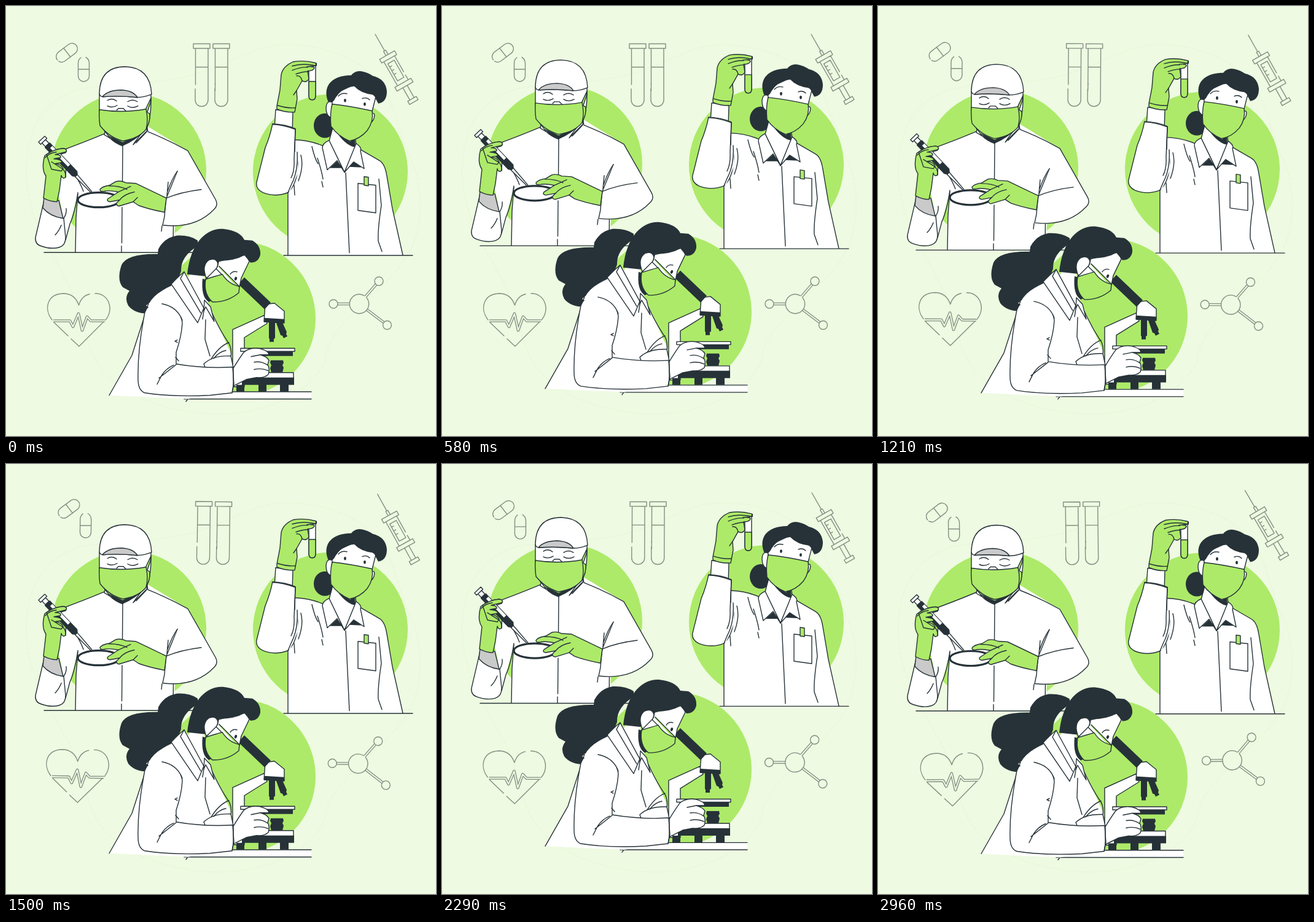
Animation, 700 px wide and 700 px high, one loop 3 s. Source, as an HTML page:

```html
<!DOCTYPE html>
<html lang="en">
<head>
<meta charset="utf-8">
<title>Scientists at work</title>
<style>
html, body { margin: 0; width: 100%; height: 100%; overflow: hidden; background: #eefae1; }
svg { display: block; width: 100vw; height: 100vh; }
path, rect, circle, ellipse { stroke-linecap: round; stroke-linejoin: round; }
.w, .g, .a, .l { stroke: #263238; stroke-width: 1.4; }
.w { fill: #fff; }
.g { fill: #adea69; }
.a { fill: #cacaca; }
.l { fill: none; }
.d { fill: #263238; }
.fw { fill: #fff; }
.fg { fill: #adea69; }
#icons { fill: none; stroke: #858d83; stroke-width: 1.4; }
#icons .wide { stroke-width: 4.6; stroke-linecap: butt; }
#icons .core { stroke: #eefae1; stroke-width: 2; }
#icons .node { fill: #eefae1; }
</style>
</head>
<body>
<svg viewBox="0 0 700 700">
<path fill="none" stroke="#e7f6d5" stroke-dasharray="5 3" d="M33 270C33 190 72 138 145 131C215 124 270 126 335 102C382 84 410 63 460 63C530 64 594 94 621 145C638 182 642 218 658 247C674 278 678 325 671 358C661 421 612 452 578 488C544 520 522 546 520 576C502 626 428 664 348 664C260 664 184 632 151 584C126 546 127 500 100 450C70 392 34 345 33 270Z"/>

<g id="icons">
  <rect x="79.500" y="67" width="39" height="18" rx="9" transform="rotate(-37 99 76)" stroke-dasharray="81 3 30"/>
  <path d="M94 69L105 83"/>
  <path d="M122 84Q117.500 87 117.500 93V114A9 9 0 0 0 135.500 114V93Q135 86 130 83.500M117.500 103H135.500"/>
  <g id="tube">
    <path d="M305 61.500H332V69H305ZM308.500 69V128M308 135V153A10.500 10.500 0 0 0 329 153V69M308.500 99.500H329"/>
  </g>
  <use href="#tube" x="32"/>
  <path d="M340.500 126V138"/>
  <g transform="translate(601 46) rotate(60.300)">
    <path d="M0 0H31M31 -2H39V2H31ZM39 -14H46V14H39ZM46 -10H76M82 -10H91V10H46M52 -6H84V6H52ZM58 6V2M65 6V2M72 6V2M91 -15H98V15H91ZM98 -4H121V4H98M121 -8H127V8H121Z"/>
  </g>
  <path d="M106 542L119 554L163 510C177 491 165 467 145 468M136 469Q123 472 118.500 487Q112 468 93 468C67 469 61 493 75 511M78 515L101 537"/>
  <path class="wide" d="M77 512.500H104L109 522L118 501L124 528L132 506L138 512.500H161"/>
  <path class="core" d="M77 512.500H104L109 522L118 501L124 528L132 506L138 512.500H161"/>
  <path class="wide" d="M575 485L533 485M575 485L607 448M575 485L620 519"/>
  <path class="core" d="M575 485L533 485M575 485L607 448M575 485L620 519"/>
  <circle class="node" cx="575" cy="485" r="15.700" stroke-dasharray="82 5"/>
  <circle class="node" cx="533" cy="485" r="7"/>
  <circle class="node" cx="607" cy="448" r="7"/>
  <circle class="node" cx="620.500" cy="519.500" r="7"/>
</g>

<g id="people">
  <!-- Man with pipette -->
  <g>
    <circle class="fg" cx="199.500" cy="268" r="126.500"/>
    <path class="fw" d="M113 401L114 345L116 310L92 300V235L161 208L190 228L230 196L296 236L275 360L272 401Z"/>
    <path class="l" d="M62 401.500H312M113 401L114 345L117 306M92 235Q125 223 161 208M272 401L272.500 355M190 227L189.500 290M189 328L188.500 386M188 391V401"/>
    <path class="w" stroke="none" d="M229 194L231 205Q266 219 296 236L341 315Q346 324 339 331C322 349 297 362 255 357L258 343Q259 330 261 313L279 269"/>
    <path fill="#fff" d="M222 206L250 220L286 242L279 269L263 302L240 290L200 260Z"/>
    <path class="l" d="M261 313Q285 303 318 299M279 269Q270 282 263 302M264 287L262 309M254 358L253 367"/>
    <path class="fw" d="M92 235L98 262L118 303Q105 350 97 385L94 346L86 310Z"/>
    <path class="w" d="M62 317L48 377Q47 388 57 391Q74 397 87 393Q97 390 97 377L94 346Q72 342 62 317Z"/>
    <path class="l" d="M117 304Q112 338 104 355L97 381M80 373Q86 367 90 357M114 278Q122 291 126 302M94 346Q99 338 98 330"/>
    <path class="a" d="M62 312L60 329Q72 343 93 346L86 317Z"/>
    <path class="d" d="M167 211L190 222L222 206L231 190L229 201Q210 220 190 228Q178 225 167 211Z"/>
    <path class="w" d="M154 191L161 205L160 210L190 228Q178 224 170 216L160 203Z"/>
    <path class="w" d="M231 190L229 204L207 226Q217 211 226 202Z"/>
    <path class="l" d="M229 205L212 223"/>
    <path class="w" d="M152 143V180L165 205L215 207L232 192Q237 170 236 143Z"/>
    <path class="w" d="M152 142Q153 99 194 99Q235 100 237 144Q226 149 213 149Q186 146 157 148Q152 147 152 142Z"/>
    <path class="a" d="M157 148Q166 137 188 137Q207 138 214 149Q186 146 157 148Z"/>
    <path class="l" d="M165 154Q173 149 180 155M198 156Q206 151 214 156M165 163Q173 167 181 162M198 163Q206 168 215 163M180 170L183 167H191L195 171"/>
    <path class="g" d="M227 169L236 150L235 158L230 173L234 176Q235 189 228 200Z"/>
    <path class="g" d="M152 169Q190 175 228 168Q232 187 228 201Q216 216 190 220Q168 214 153 195Q151 181 152 169Z"/>
    <ellipse cx="151" cy="316" rx="34" ry="12" fill="#fff" stroke="#263238" stroke-width="3.200"/>
    <path class="g" d="M153 299Q156 294 169 292L179 286Q188 284 195 288L211 289L261 313L258 336Q232 331 216 325L207 319L184 326Q179 325 180 321L185 316L169 319Q163 318 166 314L183 303Q168 300 159 302Q153 303 153 299Z"/>
    <path class="l" d="M167 293Q186 293 197 299M183 303L203 294M185 316Q193 306 209 303M207 319L214 312"/>
    <path class="g" d="M61 313L65 277Q57 266 63 244Q76 233 94 232Q101 234 97 239L87 242L98 258L97 279Q92 283 90 276L87 300L83 319Q72 319 61 313Z"/>
    <g transform="translate(58 217) rotate(46.300)">
      <path class="w" d="M0 -7H5V7H0ZM5 -4H13V4H5Z"/>
      <path class="d" d="M13 -6H78L82 -3V3L78 6H13Z"/>
      <path class="fw" d="M20 -5H62V0H20Z"/>
      <path class="w" d="M82 -2L118 0Q121 1 118 2L82 3Z"/>
    </g>
    <path class="g" d="M66 242Q78 233 94 232Q101 234 97 238L80 242Q90 242 89 247L78 249Q91 250 91 255L80 257Q90 258 93 265L90 269L74 266Z"/>
    <path class="l" d="M74 254L93 266Q98 272 97 279M64 247Q71 239 82 238"/>
  </g>

  <!-- Woman with test tube -->
  <g>
    <circle class="fg" cx="528" cy="270" r="126"/>
    <ellipse class="d" cx="519" cy="195" rx="18" ry="20"/>
    <path class="fw" d="M459 406V304L470 218Q495 218 516 229L580 236L608 252Q618 259 620 277L630 333L646 406Z"/>
    <path class="l" d="M452 406.300H662M459 406V304M470 218Q495 219 516 228M577 234L608 252Q617 257 620 277L629 330Q632 343 646 406M607 282L611 325Q605 364 606 383L612 400M553 272L559 402M498 229Q503 250 508 257M507 248Q514 269 516 282M514 286L516 295M480 243Q485 261 476 285M469 292L470 308"/>
    <path class="w" d="M439 169L437 199L466 206L467 173Z"/>
    <path class="w" stroke="none" d="M470 238L471 200Q455 193 434 192Q430 212 422 231L408 287Q406 298 418 304Q438 312 459 304Q474 290 475 260Q475 247 470 238Z"/>
    <path fill="#fff" d="M464 235L474 240L476 270L462 303L454 300Z"/>
    <path class="l" d="M434 193Q449 193 471 201M474 238Q476 270 464 292L459 304M471 201L469 250Q470 269 464 280"/>
    <path class="w" d="M573 289L602 292V337L573 333Z"/>
    <path class="g" d="M583 278L590 279V293L583 292Z"/>
    <path class="d" d="M527 264L539 253L547 264ZM557 262L566 254L579 263Z"/>
    <path class="w" d="M532 198L526 220L551 271L570 227L568 208Z"/>
    <path class="d" d="M541 210L560 221L568 215L569 230Q556 229 541 210Z"/>
    <path class="w" d="M526 219Q515 224 515 231L523 267L539 252L551 271Z"/>
    <path class="w" d="M570 224Q580 231 577 236L583 265L566 254L551 271Z"/>
    <path class="w" d="M531 145L528 188L555 214L590 195L602 148L574 125Z"/>
    <path class="d" d="M524 155Q518 139 526 127Q537 113 562 113Q569 104 581 107Q590 109 597 114Q618 119 620 139Q620 157 606 159Q602 152 599 145Q578 143 567 131Q545 133 534 154L528 160Z"/>
    <path class="w" d="M531 157Q522 153 521 166Q521 179 529 182Z"/>
    <path class="w" d="M594 175Q602 173 599 183Q597 190 591 190Z"/>
    <path class="l" d="M541 147Q546 141 555 143M580 151Q587 148 592 153"/>
    <ellipse class="d" cx="552" cy="154" rx="1.900" ry="2.800"/>
    <ellipse class="d" cx="584" cy="160" rx="1.900" ry="2.800"/>
    <path class="g" d="M531 160Q560 163 596 171Q599 188 588 203Q576 217 559 220Q540 212 529 196Q527 175 531 160Z"/>
    <path class="w" d="M493 97H504V146Q504 153 498.500 153Q493 153 493 146Z"/>
    <path class="g" d="M493 123H504V146Q504 153 498.500 153Q493 153 493 146Z"/>
    <path class="d" d="M491 93H506V98H491Z"/>
    <path class="g" d="M441 163L446 137L448 112Q451 98 468 91Q486 88 504 93Q506 96 502 98L490 99Q501 98 502 101Q501 106 491 106L493 119Q489 126 482 122L473 138L474 152L470 173Q454 174 441 168Z"/>
    <path class="l" d="M466 98Q482 93 502 97M466 105Q481 99 491 100M472 111Q483 107 492 107M482 122Q480 113 473 114M442 162Q457 167 471 166M473 138L468 145"/>
  </g>

  <!-- Woman with microscope -->
  <g>
    <circle class="fg" cx="378" cy="509" r="126"/>
    <path class="d" d="M312 382Q299 373 278 374Q258 377 248 396L247 404Q197 403 188 422Q180 446 190 458L201 464Q192 475 199 488Q210 502 235 501L270 470L285 432Q284 408 312 391Z"/>
    <path class="fw" d="M289 634L290 628H497V640H290Z"/>
    <path class="l" d="M290 628.300H497M290 640H497M290 628.300V640M296 640L293 644"/>
    <path class="w" d="M420 504L369 527V620H388V540L425 517Z"/>
    <path class="w" d="M390 597H468V610H390Z"/>
    <path class="d" d="M384 605H469V617H460V628H446V617H424V628H411V617H388V628H375V617H384ZM431 577H451L452 581L450 585L452 589L450 597H432L430 590L432 585L430 581ZM405 562H467V570H405Z"/>
    <path class="w" d="M382 557.500H470V562.500H382Z"/>
    <path class="d" d="M428 514H438V541L436 542V547H429V542L428 541ZM440 516L449 513L457 531L456 534L458 538L452 541L450 537L447 536Z"/>
    <path class="w" d="M422 486L437 484L453 497V516L420 514Z"/>
    <path class="d" d="M420 508L453 510V517L420 515ZM378 453L388 442L431 483L421 494Z"/>
    <path class="fw" d="M269 455Q240 468 232 485L218 530L205 569L168 634L296 640L360 630L368 570L337 501L323 470L290 434Z"/>
    <path class="l" d="M269 455Q240 468 232 485L205 569L168 634M336 501Q347 526 361 547Q368 555 366 573L365 586M325 511L324 543L332 570"/>
    <path class="w" d="M322 583Q336 569 366 570L370 589L325 591Z"/>
    <path class="l" d="M334 575Q347 554 363 548M338 574Q347 563 358 561"/>
    <path class="fw" d="M306 426L321 430L329 480L321 499L291 450Z"/>
    <path class="w" d="M323 479L322 497L325 490L339 514L333 490Z"/>
    <path class="w" d="M290 433Q280 441 269 453L312 516L322 492Z"/>
    <path class="l" d="M290 433L284 444L317 500M322 497L320 510"/>
    <path class="d" d="M320 444Q317 474 330 482L338 479L330 448Z"/>
    <path class="w" d="M334 419L391 405L396 416L383 443L380 458L350 460L326 445Z"/>
    <path class="d" d="M295 437Q299 399 317 379Q333 362 353 363Q381 366 388 381L401 382Q415 390 414 405Q411 418 398 418L388 406Q373 415 347 415L345 425L323 440Z"/>
    <path class="w" d="M326 443Q318 423 330 414Q342 409 345 420Q343 434 326 443Z"/>
    <path class="l" d="M365 437Q369 431 376 433"/>
    <ellipse class="d" cx="374" cy="444" rx="2" ry="3" transform="rotate(20 374 444)"/>
    <path class="w" d="M324 446L342 428L352 438L349 447Z"/>
    <path class="fg" d="M345 424L350 426L380 457L374 456Z"/>
    <path class="l" d="M347 424L380 457"/>
    <path class="g" d="M325 445Q341 440 352 437Q362 453 380 457L379 467Q360 483 336 482Q321 469 325 445Z"/>
    <path class="w" stroke="none" d="M251 486Q230 484 226 499Q214 560 215 608Q215 626 226 630Q270 637 332 634L368 630L371 612L370 588Q324 591 277 583V564Q286 537 287 516Q284 491 251 486Z"/>
    <path fill="#fff" d="M228 488Q242 473 272 480L283 494L286 507L248 500Z"/>
    <path class="l" d="M254 485Q279 490 287 512M279 544L275 546L279 548M277 584L249 606M273 585Q259 591 252 604L246 616M232 485L227 497M276 572L281 578"/>
    <path class="w" d="M370 590Q379 575 387 564Q397 555 414 558Q428 562 428 568L414 568Q425 571 428 577L426 584Q430 591 427 600Q421 606 408 605L392 608L370 619Z"/>
    <path class="l" d="M399 571L414 568M404 580Q416 578 426 585M404 592Q416 589 427 594M369 589L371 615L368 630"/>
  </g>
</g>
</svg>
<script>
const LOOP = 3000, FRAME = LOOP / 72;
const BOB_PERIOD = 1500, BOB_HEIGHT = 14;
const SWAY_START = 1000, SWAY_PERIOD = 3000;
const people = document.getElementById('people');
const icons = document.getElementById('icons');

// Triangle wave: 0 at phase 0, 1 at 0.5, back to 0 at 1.
const triangle = phase => 1 - Math.abs(1 - 2 * (phase % 1));

function sway(time) {
  if (time < SWAY_START) return 0;
  const phase = (time - SWAY_START) / SWAY_PERIOD;
  return phase < 0.25 ? phase * 4 : 2 - phase * 4;
}

function draw(elapsed) {
  // Each step shows the pose at its end.
  const time = (Math.floor((elapsed + 4) % LOOP / FRAME) + 1) * FRAME;
  const lift = BOB_HEIGHT * triangle(time / BOB_PERIOD) - 0.5;
  people.setAttribute('transform', `translate(0 ${-lift})`);
  icons.setAttribute('transform', `rotate(${sway(time)} 350 350)`);
}

let start;
function tick(now) {
  start ??= now;
  draw(now - start);
  requestAnimationFrame(tick);
}
draw(0);
requestAnimationFrame(tick);
</script>
</body>
</html>
```
